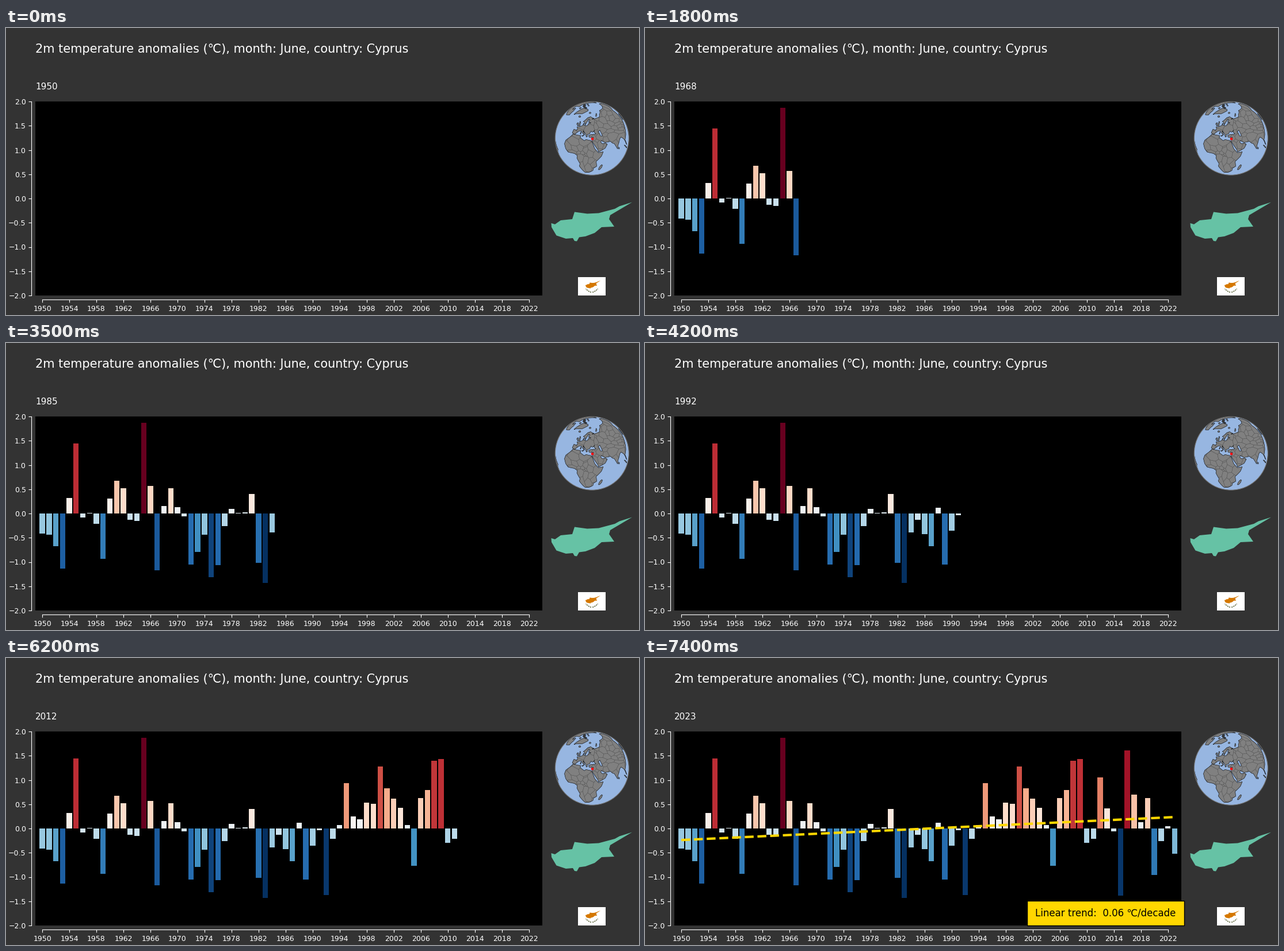
Recreate the animation shown at these times as a matplotlib script. Size 1100 px wide and 500 px high, loop 7.5 s.

```python
import numpy as np
import matplotlib.pyplot as plt
from matplotlib.animation import FuncAnimation
from matplotlib.collections import LineCollection
from matplotlib.patches import Circle, Polygon, Rectangle
from matplotlib.tri import Triangulation

W, H, DPI = 1100, 500, 100
FIRST, LAST = 1950, 2023
plt.rcParams["font.family"] = "DejaVu Sans"
rng = np.random.default_rng(4)

# Yearly June anomalies, one row per decade
anomalies = np.array([
    -.41, -.44, -.67, -1.135, .32, 1.44, -.08, .01, -.21, -.93,
    .31, .68, .52, -.13, -.15, 1.87, .57, -1.17, .155, .52,
    .13, -.06, -1.05, -.79, -.44, -1.31, -1.06, -.26, .10, .01,
    .02, .40, -1.02, -1.43, -.39, -.13, -.425, -.67, .12, -1.05,
    -.35, -.03, -1.37, -.21, .07, .935, .25, .19, .53, .51,
    1.28, .83, .62, .43, .07, -.77, .63, .79, 1.40, 1.43,
    -.29, -.21, 1.05, .41, -.06, -1.38, 1.61, .70, .13, .63,
    -.96, -.26, .05, -.52])
years = np.arange(FIRST, LAST + 1)

fig = plt.figure(figsize=(W / DPI, H / DPI), dpi=DPI, facecolor="#333333")

# Chart
LEFT = 51.33
ax = fig.add_axes([LEFT / W, 34 / H, 880.76 / W, 338 / H], facecolor="black")
ax.set(xlim=(1949, 2024), ylim=(-2, 2), xticks=range(1950, 2023, 4))
ax.tick_params(colors="white", labelsize=9)
ax.spines[["top", "right"]].set_visible(False)
for side in ("left", "bottom"):
    ax.spines[side].set_position(("outward", 5))
    ax.spines[side].set_color("white")
ax.spines["bottom"].set_bounds(1950, 2022)

scaled = (anomalies - anomalies.min()) / np.ptp(anomalies)
bars = ax.bar(years, anomalies, width=0.8, color=plt.get_cmap("RdBu_r")(scaled))
slope, offset = np.polyfit(years, anomalies, 1)
ends = np.array([FIRST, LAST])
trend, = ax.plot(ends, slope * ends + offset, "--", color="gold", lw=3)

# Overlay measured in pixels from the top left
page = fig.add_axes([0, 0, 1, 1], zorder=5)
page.set(xlim=(0, W), ylim=(H, 0))
page.axis("off")
page.text(LEFT, 43, "2m temperature anomalies (℃), month: June, country: Cyprus",
          color="white", size=15)
year_label = page.text(LEFT, 107.3, "", color="white", size=11)
trend_box = page.add_patch(Rectangle((664, 423), 273, 43, fc="gold", ec="black", lw=1))
trend_text = page.text(678, 449.5, f"Linear trend:  {slope * 10:.2f} ℃/decade",
                       color="black", size=12)

# Globe: orthographic view centred on the country
CENTRE, RADIUS = np.array([1018.3, 192.2]), 64
LON0, LAT0 = np.radians([33, 35])
OCEAN = "#97b6e1"


def project(points):
    pts = np.radians(points)
    t = np.arange(len(pts) * 6 - 5) / 6
    lon, lat = (np.interp(t, np.arange(len(pts)), column) for column in pts.T)
    lon = lon - LON0
    x = np.cos(lat) * np.sin(lon)
    y = np.cos(LAT0) * np.sin(lat) - np.sin(LAT0) * np.cos(lat) * np.cos(lon)
    depth = np.sin(LAT0) * np.sin(lat) + np.cos(LAT0) * np.cos(lat) * np.cos(lon)
    # Points behind the horizon slide onto the rim
    scale = RADIUS * np.where(depth < 0, 1 / np.hypot(x, y), 1)
    return CENTRE + np.column_stack([x * scale, -y * scale])


def land(*points, color="#808080", **style):
    shape = Polygon(project(points + points[:1]), fc=color, ec="black", lw=.4, **style)
    return page.add_patch(shape)


def island(lon, lat, width, height, tilt=0):
    a = np.linspace(0, 2 * np.pi, 9)[:-1]
    land(*zip(lon + width * np.cos(a) + tilt * np.sin(a), lat + height * np.sin(a)))


page.add_patch(Circle(CENTRE, RADIUS, fc=OCEAN, ec="none"))

atlantic_arctic = (
    (-5.5, 36), (-9, 37), (-9, 43), (-2, 43.4), (-1.2, 46), (-4.6, 48.4), (1.5, 50.2),
    (8, 53.6), (8.2, 57), (10.6, 57.6), (10, 54.5), (20, 54.5), (23.6, 59.2), (29.8, 60),
    (22, 61), (25.4, 65), (22, 65.8), (17.2, 61.5), (14.2, 55.5), (11, 59), (5, 60),
    (15, 68.5), (26, 71), (41, 67.7), (33, 66.7), (44, 67), (68, 68.5), (73, 72),
    (104, 77.6), (140, 72.5), (180, 69), (180, 62.5))
pacific_indian = (
    (160, 55), (140, 54), (127, 36), (120, 30), (108, 18), (100, 13), (103, 2), (97, 16),
    (91.5, 22.5), (87, 21.3), (80, 14), (77.6, 8.1), (72.8, 19.5), (70, 21), (66.5, 25.3),
    (57, 26), (50, 30), (48.5, 28), (51.5, 24.7), (56, 25.5), (59.8, 22.5), (55, 17),
    (43.4, 12.8), (42.6, 16.5), (35, 28), (32.6, 29.9))
mediterranean = (
    (34.5, 31.6), (36, 36.5), (27.5, 36.7), (26.3, 39.3), (31.2, 41.1), (41.5, 41.5),
    (37, 45.3), (39, 47.2), (33.6, 44.6), (30.7, 46.3), (28, 42), (23, 40.3), (24, 37.7),
    (22, 36.5), (19.4, 41.5), (13, 45.5), (18, 40.2), (16, 38), (16, 40), (9, 44.4),
    (4, 43.4), (-.3, 39), (-2, 36.8))
eurasia = land(*atlantic_arctic, *pacific_indian, *mediterranean)
africa = land(
    (-6, 35.8), (10, 37.3), (10.5, 34), (19, 30.5), (22, 32.7), (32.3, 31.2), (35.6, 23.9),
    (37.4, 18.6), (43.2, 11.5), (51.2, 11.8), (47.9, 4.5), (39.6, -4.3), (40.6, -15),
    (35, -20), (35, -25), (32.6, -28.5), (27, -33.6), (20, -34.8), (17, -29), (12, -17.5),
    (13.7, -11), (8.8, -.8), (9.5, 4), (4.3, 6.3), (-7.6, 4.4), (-13, 8), (-17.5, 14.7),
    (-16.5, 21.5), (-10, 29.5))
land((-55, 52), (-65, 60), (-78, 62), (-77, 56), (-93, 58), (-85, 67), (-128, 70),
     (-166, 68), (-140, 59), (-120, 45), (-66, 45))
land((-45, 60), (-40, 65), (-22, 71), (-12, 81.5), (-30, 83.5), (-70, 79), (-54, 70))
land((-50, 0), (-35, -6), (-45, -23), (-60, -23))
land((-5.5, 50), (1.5, 51.5), (-2, 57.6), (-5, 58.6), (-3, 54))
island(-8, 53.4, 2, 1.8)
island(-19, 65, 4.5, 1.5)
island(47, -19, 2.2, 6.5, 2)
island(18, 78.5, 7, 1.5)
island(57, 73.5, 3, 3, 5)
island(80.8, 8, 1, 1.6)
island(100, 0, 1, 6, -5)
island(137, 36, 2, 5, 4)
island(9, 41, .7, 1.8)
island(14, 37.5, 1.5, .6)
for lon in np.linspace(-65, -120, 9):
    island(lon, 75 + rng.uniform(-5, 6), rng.uniform(3, 8), rng.uniform(1, 2))
land((47, 45), (51, 46.8), (53, 41), (53.8, 37), (50, 37.5), (49, 41),
     color=OCEAN, zorder=3)

# Borders: edges of irregular cells, kept inside the continents
angle, reach = rng.uniform(0, 2 * np.pi, 130), RADIUS * np.sqrt(rng.uniform(0, 1, 130))
cells = Triangulation(CENTRE[0] + reach * np.cos(angle), CENTRE[1] + reach * np.sin(angle))
corners = np.column_stack([cells.x, cells.y])[cells.triangles].mean(axis=1)
edges = [(corners[i], corners[j]) for i, row in enumerate(cells.neighbors)
         for j in row if j > i]
for continent in (eurasia, africa):
    borders = page.add_collection(
        LineCollection(edges, colors="#404040", linewidths=.3), autolim=False)
    borders.set_clip_path(continent)

page.add_patch(Circle(CENTRE, RADIUS, fc="none", ec="#707070", lw=.8))
page.add_patch(Circle((1019, 193.2), 2.3, fc="red", ec="none", zorder=4))

# Country outline and flag
country = np.array([
    (947.5, 340), (954, 342), (964, 335), (984, 333), (988, 320.5), (1010, 323.5),
    (1030, 322.5), (1058, 315), (1066, 310.5), (1088, 303.5), (1050, 326), (1048, 333),
    (1057, 346), (1035, 347), (1023, 357), (1007, 363), (996, 364.5), (992, 371.5),
    (988, 371), (985, 366), (973, 367), (956.5, 361.5), (948, 347)])
page.add_patch(Polygon(country, fc="#66c2a5", ec="none"))

page.add_patch(Rectangle((994, 434), 48, 32, fc="white", ec="none"))
small = (country - country.min(0)) / np.ptp(country, axis=0) * (26, 14) + (1007, 440)
page.add_patch(Polygon(small, fc="#d57800", ec="none"))
u = np.linspace(0, 1, 12)
for side in (-1, 1):
    page.plot(1018 + side * (1 + 9.5 * u), 460.3 - 6 * u ** 1.6,
              color="#6b744c", lw=1.2, ls=(0, (1.4, .7)))


def update(frame):
    for i, bar in enumerate(bars):
        bar.set_visible(i < frame)
    year_label.set_text(str(min(FIRST + frame, LAST)))
    for part in (trend, trend_box, trend_text):
        part.set_visible(frame == len(years))


anim = FuncAnimation(fig, update, frames=len(years) + 1, init_func=lambda: update(0),
                     interval=100, repeat=True)
plt.show()
```
